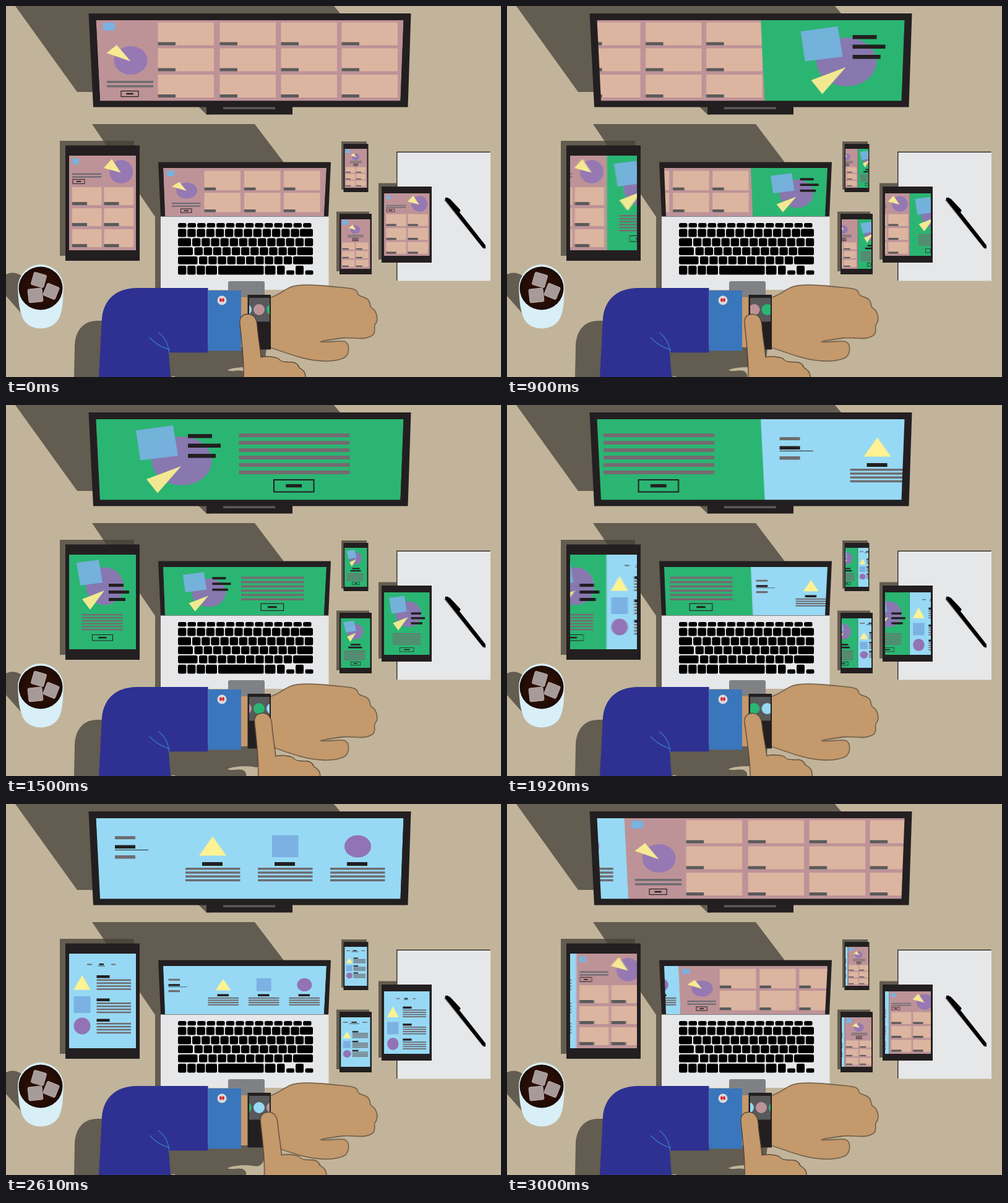
Recreate the animation shown at these times as an HTML page. Size 800 by 600 pixels, loop 3030 ms.

```html
<!DOCTYPE html>
<html lang="en">
<head>
<meta charset="utf-8">
<title>Responsive desk</title>
<style>
html, body { margin: 0; width: 100%; height: 100%; overflow: hidden; background: #c2b49a; }
svg { display: block; width: 800px; height: 600px; }
.page, #dots, #finger, .smear { animation: 3030ms steps(11) infinite; }
.page0 { animation-name: first; }
.page1 { animation-name: second; }
.page2 { animation-name: third; }
.page3 { animation-name: again; }
#dots { animation-name: dots; }
#finger { animation-name: finger; transform-origin: 394px 600px; }
.smear { animation-name: smear; animation-timing-function: step-end; }

/* --w is the width of one page on its device */
@keyframes first {
  0%, 24.75% { transform: translateX(0); }
  35.64%, 100% { transform: translateX(calc(var(--w) * -1px)); }
}
@keyframes second {
  0%, 24.74% { transform: translateX(calc(var(--w) * 3px)); }
  24.75% { transform: translateX(calc(var(--w) * 1px)); }
  35.64%, 58.41% { transform: translateX(0); }
  69.3%, 100% { transform: translateX(calc(var(--w) * -1px)); }
}
@keyframes third {
  0%, 58.4% { transform: translateX(calc(var(--w) * 3px)); }
  58.41% { transform: translateX(calc(var(--w) * 1px)); }
  69.3%, 89.1% { transform: translateX(0); }
  100% { transform: translateX(calc(var(--w) * -1px)); }
}
@keyframes again {
  0%, 89.09% { transform: translateX(calc(var(--w) * 3px)); }
  89.1% { transform: translateX(calc(var(--w) * 1px)); }
  100% { transform: translateX(0); }
}
@keyframes dots {
  0%, 24.75% { transform: translateX(0); }
  35.64%, 58.41% { transform: translateX(-21px); }
  69.3%, 89.1% { transform: translateX(-42px); }
  100% { transform: translateX(-63px); }
}
@keyframes finger {
  0% { transform: translateX(0) rotate(0deg); animation-timing-function: steps(15); }
  14.85% { transform: translateX(35.5px) rotate(0deg); }
  24.75% { transform: translateX(35.5px) rotate(0deg); animation-timing-function: steps(6); }
  30.69% { transform: translateX(0) rotate(0deg); }
  39.6% { transform: translateX(0) rotate(0deg); animation-timing-function: steps(15); }
  54.45% { transform: translateX(35.5px) rotate(0deg); }
  58.41% { transform: translateX(35.5px) rotate(0deg); animation-timing-function: steps(5); }
  63.36% { transform: translateX(9px) rotate(-2deg); animation-timing-function: steps(1); }
  64.35% { transform: translateX(9px) rotate(-3.6deg); }
  73.26% { transform: translateX(9px) rotate(-3.6deg); animation-timing-function: steps(14); }
  87.12% { transform: translateX(35.5px) rotate(0deg); }
  89.1% { transform: translateX(35.5px) rotate(0deg); animation-timing-function: steps(6); }
  95.04%, 100% { transform: translateX(0) rotate(0deg); }
}
@keyframes smear {
  0%, 35.64%, 69.3% { filter: none; }
  24.75%, 58.41%, 89.1% { filter: url(#blur); }
  100% { filter: none; }
}
</style>
</head>
<body>
<svg viewBox="0 0 800 600">
  <defs>
    <filter id="blur"><feGaussianBlur stdDeviation="1.2 0"/></filter>
    <clipPath id="watchClip"><rect x="393" y="472" width="33" height="39"/></clipPath>
    <radialGradient id="coffee"><stop offset=".6" stop-color="#2a0e04"/><stop offset="1" stop-color="#1d0a04"/></radialGradient>
  </defs>
  <rect width="800" height="600" fill="#c2b49a"/>

  <g fill="#635c50">
    <path d="M15 0H530L540 12V40H141V139H115Z"/>
    <path d="M311 163H330V175.5H324Z"/>
    <path d="M139 191H402L449 253V341H260V458H241V341Z"/>
    <path d="M87 218H207V404H87Z"/>
    <path d="M542 219H583V297H542Z"/>
    <path d="M534 332.5H587V429H534Z"/>
    <path d="M602 286.5H684V410H602Z"/>
    <path d="M0 434C10 429 20 432 27 438L60 470L30 503L0 469Z"/>
    <path d="M110 600L111 548C113 523 126 509 148 509H170V550H421C420 570 417 586 404 586C392 583 366 584 358 589C364 592 374 588 382 590C387 592 389 596 388 600Z"/>
  </g>
  <path d="M157 218H207V226H162.500Z" fill="#4c463c"/>
  <path d="M267 600Q270 597 274 600Z" fill="#c2b49a"/>

  <g fill="#231f20">
    <path d="M324 163H463V175.5H324Z"/>
    <path d="M351 163H435V167H351Z" fill="#58595b"/>
    <path d="M133.500 12H654.500L649.500 163.500H141Z"/>
    <path d="M246 252.500H525L521 341H250Z"/>
    <path d="M96 225.500H216V412H96Z"/>
    <path d="M545.500 223H585.500V301H545.500Z"/>
    <path d="M539 336H591V434H539Z"/>
  </g>

  <path d="M631 235.500H782.500V444H631Z" fill="#38352f"/>
  <path d="M632.500 237H783V444.500H632.500Z" fill="#e6e7e9"/>
  <path d="M607 292H688V415H607Z" fill="#231f20"/>

  <g fill="none" stroke-linecap="round">
    <path d="M710 314L772 391" stroke="#77787a" stroke-width="3"/>
    <path d="M713 313L772 388" stroke="#000" stroke-width="6"/>
    <path d="M716 314L732 331" stroke="#000" stroke-width="5"/>
    <path d="M711 311L714 314M771 387L774 391" stroke="#000" stroke-width="2.500"/>
  </g>

  <path d="M250 340.500H521.500V459H250Z" fill="#e6e7e9"/>
  <rect x="359" y="445" width="59" height="30" rx="3" fill="#808184"/>
  <g id="keys"></g>
  <g id="screens"></g>

  <path d="M19 456C20 475 21 488 25 499C32 529 80 529 88 499C92 488 92 475 93 456A37 38 0 0 0 19 456Z" fill="#d8eff8"/>
  <ellipse cx="56" cy="456.500" rx="35.500" ry="35" fill="url(#coffee)"/>
  <g fill="#a79b99" stroke="#c0b6b4" stroke-width=".8">
    <rect x="-10.500" y="-10.500" width="21" height="21" rx="2" transform="translate(53 443) rotate(16)"/>
    <rect x="-10.500" y="-10.500" width="21" height="21" rx="2" transform="translate(73 461.500) rotate(22)"/>
    <rect x="-11.500" y="-11" width="23" height="22" rx="2" transform="translate(47.500 468) rotate(-6)"/>
  </g>

  <path d="M150 600L155 505C158 475 178 456 212 456H326.500V560.500H263L266 600Z" fill="#2e3192"/>
  <path d="M246 528Q262 539 263.500 561M232 536Q246 551 265 556" fill="none" stroke="#3a76bc" stroke-width="1.300"/>
  <path d="M326.500 460H380V557.500H326.500Z" fill="#3a76bc"/>
  <circle cx="349" cy="476" r="7.500" fill="#d9dadb"/>
  <g fill="#d8232a"><ellipse cx="347" cy="475.500" rx="1.800" ry="3"/><ellipse cx="351" cy="475.500" rx="1.800" ry="3"/></g>

  <g fill="#c4996c" stroke="#77664f" stroke-width="1.800">
    <path d="M380 471H392V552H380Z" stroke="none"/>
    <path d="M426 472C440 468 448 460 459 455C472 449 500 451 520 453C543 456 566 455 568 463C569 471 578 469 584 474C591 480 586 486 592 489C600 494 602 509 597 514C593 519 599 526 593 532C580 542 562 535 543 537C530 539 512 541 509 543C520 545 540 540 548 543C556 547 555 562 548 568C538 574 520 575 510 574C480 573 452 560 426 552Z"/>
  </g>
  <path d="M390.500 467H428V555.500H390.500Z" fill="#231f20"/>
  <path d="M393 472H426V510.500H393Z" fill="#58595b"/>
  <g clip-path="url(#watchClip)"><g id="dots"></g></g>

  <g id="finger">
    <path d="M384 650V600C385 570 380 535 378 513C377 502 384 498 392 498.500C402 499 405 507 406 516C407 535 411 552 412 568C420 566 433 567 440 570C445 577 452 575 458 576C467 575 472 579 474 585C480 588 484 593 484 599L490 650Z" fill="#c4996c" stroke="#4a3c2e" stroke-width="1.200"/>
  </g>
</svg>
<script>
const INK = '#231f20', GREY = '#6e6c70', TAG = '#5a5a5a';
const PINK = '#bd9398', GREEN = '#2bb573', SKY = '#97d9f4', CARD = '#dcb5a0';
const YELLOW = '#fff293', BLUE = '#7cb1e3', PURPLE = '#9273b5';
const PAGES = [PINK, GREEN, SKY, PINK];

const $ = id => document.getElementById(id);
const span = n => [...Array(n).keys()];
const rect = (x, y, w, h, fill, more = '') => `<rect x="${x}" y="${y}" width="${w}" height="${h}" fill="${fill}" ${more}/>`;
const poly = (points, fill) => `<polygon points="${points}" fill="${fill}"/>`;
const oval = (x, y, rx, ry, fill) => `<ellipse cx="${x}" cy="${y}" rx="${rx}" ry="${ry}" fill="${fill}"/>`;
const lines = (n, x, y, w, h, pitch, fill = GREY) => span(n).map(i => rect(x, y + i * pitch, w, h, fill)).join('');
const button = (x, y, w, h, stroke) =>
  rect(x, y, w, h, 'none', `stroke="${INK}" stroke-width="${stroke}"`) +
  rect(x + w * .3, y + h * .36, w * .4, h * .27, INK);
const cards = (xs, ys, w, h, tagW, tagH) => ys.map(y => xs.map(x =>
  rect(x, y, w, h, CARD) + rect(x, y + h - tagH, tagW, tagH, TAG)).join('')).join('');
const fit = (sx, sy, dx, dy, art) => `<g transform="matrix(${sx} 0 0 ${sy} ${dx} ${dy})">${art}</g>`;

const shapes = (square, circle, tri) =>
  oval(...circle, '#8878af') +
  `<g opacity=".96">${poly(square, '#76b2de')}</g>` + poly(tri, '#f1e991');
const pie = (logo, circle, tri) =>
  rect(...logo, '#79b2e2') + oval(...circle, '#9678b3') + poly(tri, '#f7e993');

const wide = {
  pink: pie([157, 27, 19, 12.5], [201.5, 88, 27, 23], '179,63 201.5,89.5 162.5,76') +
    lines(2, 163, 121, 75, 3.5, 7) + button(186, 137.5, 28, 9, 1.2) +
    cards([245.5, 345.5, 444.5, 542.5], [26.5, 68.5, 111], 90.5, 37, 28.5, 5),
  green: shapes('210,41 270,33 278,82 217,89.5', [284, 90.5, 48.5, 39.5], '283,99 227,120 245,142.5') +
    rect(294, 47, 39, 6.5, INK) + rect(294, 62.5, 53, 6.5, INK) + rect(294, 79, 45, 6.5, INK) +
    lines(6, 376.5, 46, 179, 6, 12, '#756a70') + button(433, 121, 64.5, 19.5, 2),
  blue: rect(176, 52, 33, 5, GREY) + rect(176, 66.5, 33, 5.5, INK) + rect(176, 83, 33, 5.5, GREY) +
    rect(176, 73.8, 54, 1, INK) + poly('334,52.5 312,83.5 356,83.5', YELLOW) +
    rect(430, 50.5, 42.5, 35.5, BLUE) + oval(568.5, 68.5, 21.5, 18, PURPLE) +
    [290, 407, 524].map(x => rect(x + 27, 94, 33, 6, INK) + lines(4, x, 103, 88.5, 3.5, 6.2)).join('')
};

const laptopPink = pie([260, 266.5, 12, 8.5], [292, 298.5, 17, 13], '280,284.5 292,299 268,292') +
  lines(2, 268, 318, 46.5, 2.2, 4.6) + button(282.5, 328, 17.5, 6, 1) +
  cards([320.5, 385, 449], [266.5, 302], 58.5, 31.5, 18.5, 4.5);

const tablet = {
  pink: pie([107.5, 246.5, 10, 9.5], [186, 268, 19, 19], '171,247.5 185.5,269.5 158,262') +
    lines(2, 107, 270.5, 47, 2.4, 4.7) + button(108, 280.3, 19, 7, 1) +
    cards([107, 158.5], [293, 327, 361], 47.5, 29, 24, 5),
  green: shapes('114,255 150,250.5 156,287 120,292', [159.5, 293, 30.5, 30.5], '159,300 123,314 136,331') +
    rect(166, 289, 24, 5, INK) + rect(166, 300, 33, 5, INK) + rect(166, 312, 27, 5, INK) +
    lines(6, 122, 338, 67, 2.4, 4.8, '#756a70') + button(139.5, 371.5, 33, 9.5, 1),
  blue: rect(131, 258.5, 8, 2, GREY) + rect(150.5, 258, 7.5, 2.5, INK) + rect(170, 258.5, 7, 2, GREY) +
    rect(148.5, 261.6, 11.5, .8, INK) + poly('123,277 109,300.5 136.5,300.5', YELLOW) +
    rect(109.5, 311, 27, 27, BLUE) + oval(123, 359, 13.5, 13.5, PURPLE) +
    [277, 314.5, 347.5].map(y => rect(146.5, y, 21, 4.5, INK) + lines(4, 146.5, y + 6.5, 55.5, 2.5, 4.9)).join('')
};

const phone = {
  pink: pie([549, 232, 7, 6], [565, 244, 6, 5.5], '562,238 566,244.5 557,242') +
    lines(2, 555.5, 250.7, 20, 1.2, 2.2) + button(562, 255.5, 6.5, 2.8, .7) +
    cards([549, 566], [260.5, 271.5, 282.5], 15.5, 9, 8, 1.6),
  green: shapes('550.5,236 563.5,234 566.5,247 553.5,249', [565, 248, 10, 10], '566,249.5 555,254.5 559,261') +
    rect(559.5, 263.5, 12, 2, INK) + rect(556.5, 267, 17, 2.2, INK) +
    lines(6, 551, 272, 26.5, 1.2, 2.2, '#756a70') + button(559.5, 286.5, 12, 4.3, .6),
  blue: rect(550, 236.7, 6, 1.2, GREY) + rect(560.5, 236.5, 6.5, 1.4, INK) + rect(574, 236.7, 6, 1.2, GREY) +
    rect(558, 238.7, 12, .6, INK) + poly('555,249 549.5,257.5 560,257.5', YELLOW) +
    rect(550, 261, 9.5, 9.2, BLUE) + oval(555, 277.5, 5, 4.8, PURPLE) +
    [248.5, 261, 272.5].map(y => rect(561.5, y, 7.5, 1.7, INK) + lines(4, 561.5, y + 2.3, 19.5, 1.1, 1.8)).join('')
};

const box = (x, y, r, b) => `${x},${y} ${r},${y} ${r},${b} ${x},${b}`;
const toPhone = art => fit(1.3, 1.27, 541.5 - 547.5 * 1.3, 345 - 231 * 1.27, art);
const small = 611 - 102 * .681;

const devices = [
  { w: 485, shape: '145.5,23 642.5,23 637.5,153.5 152,153.5', art: wide },
  { w: 257, shape: '254,262 518,262 514,340 257,340', art: {
    pink: laptopPink,
    green: fit(.566, .58, 167, 251, wide.green),
    blue: fit(.56, .59, 164, 252, wide.blue) } },
  { w: 108, shape: box(102, 242, 210, 395), art: tablet, soft: true },
  { w: 73.5, shape: box(611, 303, 684.5, 404), art: {
    pink: fit(.681, .66, small, 303 - 242 * .66, tablet.pink),
    green: fit(.681, .69, small, 136, tablet.green),
    blue: fit(.681, .735, small, 124, tablet.blue) } },
  { w: 36, shape: box(547.5, 231, 583.5, 294), art: phone },
  { w: 47, shape: box(541.5, 345, 588.5, 425), art: {
    pink: toPhone(phone.pink), green: toPhone(phone.green), blue: toPhone(phone.blue) } }
];

$('screens').innerHTML = devices.map(({ w, shape, art, soft }, i) => {
  const order = [art.pink, art.green, art.blue, art.pink];
  const pages = order.map((content, n) =>
    `<g class="page page${n}">${poly(shape, PAGES[n])}${content}</g>`).join('');
  return `<clipPath id="clip${i}">${poly(shape, INK)}</clipPath>
    <g clip-path="url(#clip${i})" style="--w:${w}"><g class="${soft ? 'smear' : ''}">${pages}</g></g>`;
}).join('');

$('dots').innerHTML = [SKY, PINK, GREEN, SKY, PINK, GREEN].map((c, i) => oval(388 + 21 * i, 491, 9, 9, c)).join('');

const key = (x, y, w, h) => rect(x, y, w, h, '#000', 'rx="2.5"');
const row = (first, n, x, pitch, y, h) =>
  (first ? key(278, y, first, h) : '') + span(n).map(i => key(x + i * pitch, y, 13.4, h)).join('');
$('keys').innerHTML =
  row(0, 14, 278, 15.55, 351, 7.3) +
  row(0, 13, 278, 15.2, 360.5, 13) + key(475, 360.5, 21, 12.5) +
  row(21, 13, 301, 15.15, 375.5, 13) +
  row(24, 11, 304.5, 15.1, 390.3, 12.7) + key(470.5, 390.3, 25.5, 12.7) +
  row(31.5, 10, 312, 15.2, 405, 12.7) + key(464, 405, 32, 12.7) +
  row(0, 3, 278, 15.1, 420, 14.5) + key(323, 420, 18, 14.5) + key(343, 420, 73.5, 14.5) +
  key(418.5, 420, 17, 14.5) + key(438, 420, 12.5, 14.5) + key(453, 427.5, 13, 7) +
  key(468, 420, 13, 14.5) + key(483.5, 427.5, 13, 7);
</script>
</body>
</html>
```
